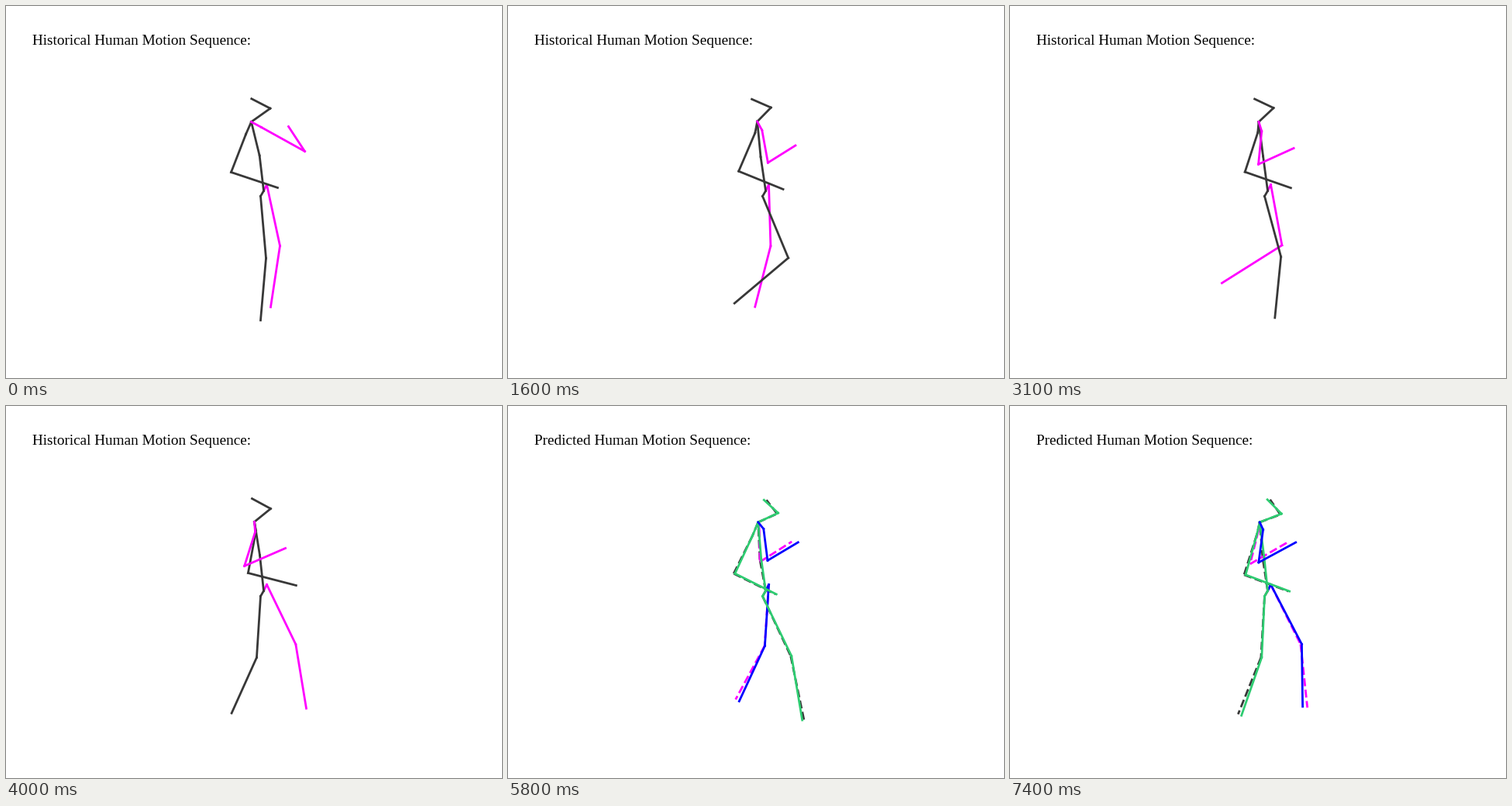
Write a matplotlib script that moves like this. It is 640 by 480 pixels and loops after 7.5 s.

```python
import numpy as np
import matplotlib.pyplot as plt
from matplotlib.animation import FuncAnimation

W, H, DPI = 640, 480, 100
FRAMES, STEP = 75, 100
SPLIT = 5.0      # s, prediction starts
PERIOD = 3.45    # s, one stride
STRIKE = 2.2     # s, right heel meets the ground
LAG = 0.07       # s, delay of the predicted gait

FIXED = {"pelvis": (333, 238), "r_hip": (329, 245), "l_hip": (337, 230)}

# One stride, shared by both legs: phase, then knee and ankle from the hip.
STRIDE = np.array([
    [0.030, 37, 77, 52, 160],
    [0.240, 23, 78, 17, 157],
    [0.520, -5, 79, -37, 151],
    [0.660, -2, 79, -70, 131],
    [0.742, 8, 78, -69, 126],
    [0.813, 35, 79, -39, 133],
    [0.906, 43, 77, 8, 149],
])
LEGS = {"r": (0.0, 0.0), "l": (0.5, 0.13)}  # phase shift, hurry in mid-stance

# Upper body: rest point, swing with the stride, shift after turning.
UPPER = {
    "neck": [(321.5, 149), (0.5, 0), (1.5, 0.5)],
    "mid": [(327, 193.5), (-1, 1.5), (-1, 3)],
    "nose": [(340.5, 131), (-1.5, -1), (8, 8)],
    "top": [(316, 119.5), (-2, 0.5), (19, 1)],
    "r_sho": [(320, 163), (-3, 2), (-2.5, 3)],
    "r_elb": [(303, 213.5), (-10, -1.5), (-6, 3)],
    "r_wri": [(362, 234.5), (-13, 3.5), (-9.5, 6)],
    "l_sho": [(325.5, 161), (3.5, -1), (-2.5, -1.5)],
    "l_elb": [(322, 203.5), (14, -2.5), (-4, -1.5)],
    "l_wri": [(367, 183), (6, 0), (-3.5, -8.5)],
}
# Opening move out of standing, at 0 s and 1 s.
OPENING = {
    "neck": [(317, 149), (321, 148)],
    "l_sho": [(330, 156), (331, 157)],
    "l_elb": [(386, 187), (368, 195)],
    "l_wri": [(365, 155), (372, 164)],
    "r_sho": [(310, 165), (317, 163)],
    "r_elb": [(291, 214), (295, 213)],
    "r_wri": [(351, 234), (353, 235)],
    "r_knee": [(336, 325), (344, 326)],
    "r_ank": [(329, 405), (300, 397)],
    "l_knee": [(354, 309), (347, 310)],
    "l_ank": [(342, 388), (328, 390)],
}
# Constant part of the prediction error.
BIAS = {
    "mid": (2, 0), "nose": (1.5, -1), "top": (-3.5, 0),
    "r_elb": (2, 0), "r_wri": (1.5, 0),
    "l_sho": (6, -1), "l_elb": (11, -2), "l_wri": (9, 1),
}

CHAINS = [
    ("l", "pelvis l_hip l_knee l_ank"),
    ("r", "pelvis r_hip r_knee r_ank"),
    ("r", "pelvis mid neck nose top"),
    ("r", "neck r_sho r_elb r_wri"),
    ("l", "neck l_sho l_elb l_wri"),
]
BONES = []
for side, chain in CHAINS:
    names = chain.split()
    BONES += [(side, a, b) for a, b in zip(names, names[1:])]


def ease(t, start, end):
    u = np.clip((t - start) / (end - start), 0, 1)
    return u * u * (3 - 2 * u)


# The stride repeated either side, so that the curve closes smoothly.
LOOP = np.vstack([STRIDE + [k, 0, 0, 0, 0] for k in (-1, 0, 1)])
SLOPE = np.gradient(LOOP[:, 1:], LOOP[:, 0], axis=0)


def stride(phase):
    """Cubic Hermite curve through the stride poses."""
    ts, ps = LOOP[:, 0], LOOP[:, 1:]
    i = np.searchsorted(ts, phase, side="right") - 1
    h = ts[i + 1] - ts[i]
    u = (phase - ts[i]) / h
    v = 1 - u
    return (v * v * (1 + 2 * u) * ps[i] + u * v * v * h * SLOPE[i]
            + u * u * (1 + 2 * v) * ps[i + 1] - u * u * v * h * SLOPE[i + 1])


def pose(t):
    joints = {name: np.array(p, float) for name, p in FIXED.items()}
    phase = (t - STRIKE) / PERIOD
    for side, (shift, hurry) in LEGS.items():
        p = (phase + shift) % 1
        if p < 0.5:
            p += hurry * np.sin(2 * np.pi * p) ** 2
        leg = stride(p)
        joints[side + "_knee"] = joints[side + "_hip"] + leg[:2]
        joints[side + "_ank"] = joints[side + "_hip"] + leg[2:]

    turn = ease(t, 4, 5)
    swing = np.cos(2 * np.pi * phase) * (1 - 0.45 * turn)
    for name, parts in UPPER.items():
        joints[name] = np.array([1, swing, turn]) @ np.array(parts)

    walk = ease(t, 1, 1.9)
    for name, (a, b) in OPENING.items():
        start = np.array(a) + t * np.subtract(b, a)
        joints[name] = start + walk * (joints[name] - start)
    return joints


def predict(t):
    grow = ease(t, SPLIT, SPLIT + 1)
    joints = pose(t - LAG * grow)
    for name, shift in BIAS.items():
        joints[name] = joints[name] + grow * np.array(shift)
    return joints


fig = plt.figure(figsize=(W / DPI, H / DPI), dpi=DPI, facecolor="white")
ax = fig.add_axes([0, 0, 1, 1])
ax.set_xlim(0.5, W + 0.5)
ax.set_ylim(H - 0.5, -0.5)
ax.axis("off")
title = fig.text(34 / W, 1 - 50 / H, "", family="Liberation Serif",
                 fontsize=13.9, color="black", va="baseline")


def skeleton(right, left):
    colors = {"r": right, "l": left}
    return [ax.plot([], [], color=colors[side], lw=2)[0] for side, _, _ in BONES]


truth = skeleton("#383838", "#ff00ff")
guess = skeleton("#2ecc71", "#0000ff")


def place(lines, joints):
    for line, (_, a, b) in zip(lines, BONES):
        line.set_data(*zip(joints[a], joints[b]))


def update(n):
    t = n * STEP / 1000
    future = t >= SPLIT
    place(truth, pose(t))
    if future:
        place(guess, predict(t))
    for line in truth:
        line.set_linestyle("--" if future else "-")
    for line in guess:
        line.set_visible(future)
    kind = "Predicted" if future else "Historical"
    title.set_text(kind + " Human Motion Sequence:")
    return truth + guess + [title]


anim = FuncAnimation(fig, update, frames=FRAMES, interval=STEP,
                     repeat=True, repeat_delay=0, blit=False)
plt.show()
```
